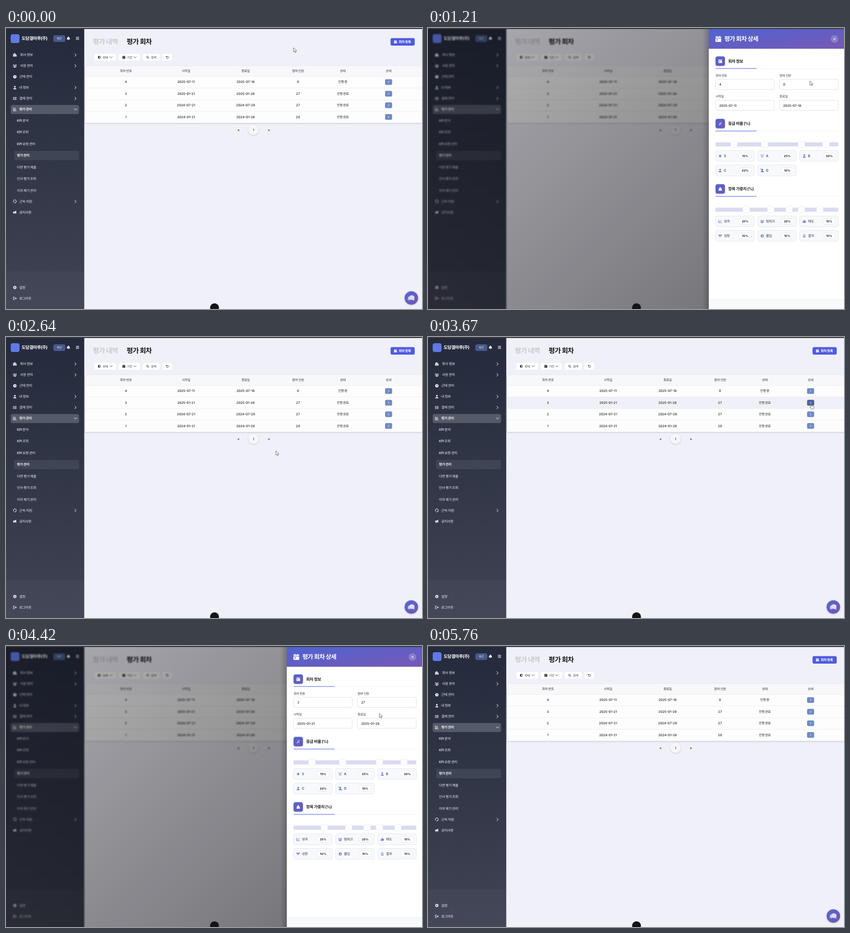
Recreate the animation shown at these times as an HTML page. Size 800 by 542 pixels, loop 5790 ms.

```html
<!DOCTYPE html>
<html lang="ko">
<head>
<meta charset="utf-8">
<title>평가 회차</title>
<style>
  html, body { margin: 0; width: 100%; height: 100%; overflow: hidden; background: #f0f0f9; }
  svg { display: block; width: 100%; height: 100%; }
  text { font-family: Inter, "Noto Sans CJK KR", "Noto Sans CJK", sans-serif; text-rendering: geometricPrecision; }
  .ko { letter-spacing: -.055em; }
  .line { fill: none; stroke: currentColor; stroke-width: 1.5; stroke-linecap: round; stroke-linejoin: round; }
  #page, #shade, #drawer, #cursor, .blink { animation: 5790ms linear infinite; }
  .blink { animation-timing-function: step-end; }
  #page { animation-name: soften; }
  #shade { animation-name: shade; }
  #drawer { animation-name: drawer; }
  #cursor { animation-name: cursor; }
</style>
</head>
<body>
<svg id="stage" viewBox="0 0 800 542" preserveAspectRatio="none"></svg>
<script>
const LOOP = 5790;
const styles = [];
let blinkCount = 0;

const keyframes = (name, frames) => styles.push(
  `@keyframes ${name}{${frames.map(([ms, css]) => `${(ms / LOOP * 100).toFixed(3)}%{${css}}`).join('')}}`);

// Wraps content that is only visible inside the given [start, end] windows.
function during(windows, content) {
  const name = `blink${blinkCount++}`;
  const startsOn = windows[0][0] === 0;
  const frames = startsOn ? [] : [[0, 'opacity:0']];
  windows.forEach(([start, end]) => frames.push([start, 'opacity:1'], [end, `opacity:${end === LOOP ? 1 : 0}`]));
  if (frames[frames.length - 1][0] !== LOOP) frames.push([LOOP, `opacity:${startsOn ? 1 : 0}`]);
  keyframes(name, frames);
  return `<g class="blink" style="animation-name:${name}">${content}</g>`;
}

const rect = (x, y, w, h, fill, r = 0, extra = '') =>
  `<rect x="${x}" y="${y}" width="${w}" height="${h}" rx="${r}" fill="${fill}" ${extra}/>`;
const circle = (x, y, r, fill, extra = '') => `<circle cx="${x}" cy="${y}" r="${r}" fill="${fill}" ${extra}/>`;

function text(x, y, label, size, { fill = '#222', weight = 500, anchor = 'start' } = {}) {
  const cls = /[가-힣]/.test(label) ? 'class="ko"' : '';
  const safe = label.replace('<', '&lt;').replace('>', '&gt;');
  return `<text ${cls} x="${x}" y="${y + size * .36}" font-size="${size}" font-weight="${weight}" fill="${fill}" text-anchor="${anchor}">${safe}</text>`;
}
const centered = (x, y, label, size, options = {}) => text(x, y, label, size, { ...options, anchor: 'middle' });

// Icons live in a box from -5 to 5.
const fills = {
  building: 'M-5-3H-2V-5H2V-1H5V5H-5ZM-3-1V0H-2V-1ZM-3 2V3H-2V2ZM0-3V-2H1V-3ZM0 1V5H1V1Z',
  users: 'M-3.4-4a1.5 1.5 0 1 0 .1 0M3.4-4a1.5 1.5 0 1 0 .1 0M0-2.6a1.8 1.8 0 1 0 .1 0M-3.5 5q0-3.6 3.5-3.6T3.5 5ZM-5.5 2.5q0-3 3-2.8l-1.4 2.8ZM5.5 2.5q0-3-3-2.8l1.4 2.8Z',
  clock: 'M0-5a5 5 0 1 0 .1 0M-.6-3H.6V-.3L2.4 1 1.7 2-.6.4Z',
  user: 'M0-5a2.5 2.5 0 1 0 .1 0M-4.5 5q0-4 4.5-4T4.5 5Z',
  list: 'M-5-4h2v2h-2ZM-2-3.6H5v1.2H-2ZM-5-1h2v2h-2ZM-2-.6H5V.6H-2ZM-5 2h2v2h-2ZM-2 2.4H5v1.2H-2Z',
  chart: 'M-5-5h1.6V3.4H5V5H-5ZM-2-4H2v1.5H-2ZM-2-1.3H4V.2H-2ZM-2 1.3H1v1.3H-2Z',
  horn: 'M-5-2H-1L4-5V4L-1 2H-2L-1 5H-3L-4 2H-5Z',
  bell: 'M-.7-5H.7V-4Q3.6-3.4 3.6 0L4.8 3H-4.8L-3.6 0Q-3.6-3.4-.7-4ZM-1.5 3.6H1.5Q1 5 0 5T-1.5 3.6Z',
  calendar: 'M-5-4H-3V-5.4H-1.7V-4H1.7V-5.4H3V-4H5V-2H-5ZM-5-1.2H5V5H-5ZM-3 .6V2.6H-1V.6Z',
  gear: 'M-1-5H1L1.4-3.4 3-4.2 4.3-2.8 3.4-1.3 5-1V1L3.4 1.4 4.2 3 2.8 4.3 1.3 3.4 1 5H-1L-1.4 3.4-3 4.2-4.3 2.8-3.4 1.3-5 1V-1L-3.4-1.4-4.2-3-2.8-4.3-1.3-3.4ZM0-1.7a1.7 1.7 0 1 0 .1 0',
  half: 'M0-5a5 5 0 1 0 .1 0M0-3.7V3.7A3.7 3.7 0 0 0 0-3.7Z',
  star: 'M0-5 1.5-1.8 5-1.4 2.4 1 3.1 4.6 0 2.8-3.1 4.6-2.4 1-5-1.4-1.5-1.8Z',
  weight: 'M0-5a2 2 0 0 1 1.8 2.6H3.2L5 4.6H-5L-3.2-2.4H-1.8A2 2 0 0 1 0-5Z',
  thumb: 'M-5-1H-3V5H-5ZM-2-1L0-5Q2-5 1.2-1.6H5L4 4.5H-2Z',
  sprout: 'M-5-4Q0-4-.3.3 0-3.8 5-4.4 5 .6.7.9V5H-.7V1.6Q-5 1.6-5-4Z',
  flame: 'M-1-5Q0-3 1.4-3L2.5-4Q4.6-1.3 4.6.6A4.6 4.4 0 0 1-4.6.6Q-4.4-2.6-1-5ZM0-.8Q-2.6 1.4-1.5 2.8T1.8 2.4 0-.8Z'
};
const lines = {
  right: 'M-2-4 2 0-2 4', down: 'M-4-2 0 2 4-2', cross: 'M-3-3 3 3M3-3-3 3', bars: 'M-4-3.4H4M-4 0H4M-4 3.4H4',
  search: 'M-1-4a3.2 3.2 0 1 0 .1 0M1.5 1.5 4.5 4.5', undo: 'M-4-4V-1H-1M-3.6-1.2A4 4 0 1 1-3 3',
  exit: 'M-1-4H-4V4H-1M-1 0H4.5M2-2.5 4.5 0 2 2.5', headset: 'M-4 1V-1A4 4 0 0 1 4-1V1Q4 4 0 4M-3.6 0V2M3.6 0V2M0 4H1',
  percent: 'M-3 3.5 3-3.5M-2.5-2.6V-2.5M2.5 2.5V2.6', medal: 'M-4-4.5-1.5-1M4-4.5 1.5-1M0-1a2.7 2.7 0 1 0 .1 0',
  trend: 'M-4.5-4V4H4.5M-2.5 1-.6-1 1 .4 4-3', ribbon: 'M0-4.5a2.7 2.7 0 1 0 .1 0M-2 1-2.8 4.6 0 3.2 2.8 4.6 2 1', slash: 'M-4.5-4.5 4.5 4.5'
};
const icon = (name, x, y, size, color) =>
  `<g transform="translate(${x} ${y}) scale(${size / 10})" color="${color}">` +
  (fills[name] ? `<path d="${fills[name]}" fill="${color}" fill-rule="evenodd"/>` : `<path class="line" d="${lines[name]}"/>`) + '</g>';

const gradient = (id, from, to, box = 'x2="1" y2="1"') =>
  `<linearGradient id="${id}" ${box}><stop ${from}/><stop offset="1" ${to}/></linearGradient>`;
const stop = (color, opacity = 1) => `stop-color="${color}" stop-opacity="${opacity}"`;

const defs = `<defs>
  ${gradient('side', stop('#242a3b'), stop('#404455'), 'x2="0" y2="1"')}
  ${gradient('violet', stop('#5468d0'), stop('#7356ae'))}
  ${gradient('head', stop('#4f63d2'), stop('#7759b4'))}
  ${gradient('tile', stop('#5067cb'), stop('#6c58b8'))}
  ${gradient('edge', stop('#000', 0), stop('#000', .2), 'x2="1" y2="0"')}
  ${gradient('dim', stop('#000', .28), stop('#000', .56), 'gradientUnits="userSpaceOnUse" x1="64.5" y1="-64.5" x2="735.5" y2="606.5"')}
  <filter id="soft" x="-30%" y="-30%" width="160%" height="180%"><feDropShadow dx="0" dy="1" stdDeviation="1.6" flood-color="#223" flood-opacity=".2"/></filter>
</defs>`;

function sidebar() {
  const item = (name, label, y, x = 25.5, chevron = 'right', weight = 500) =>
    icon(name, 17, y, 6.6, '#e8e9ee') + text(x, y, label, 6.7, { fill: '#eeeff3', weight }) +
    (chevron ? icon(chevron, 133.7, y, 6.4, '#fff') : '');
  const children = ['KPI 분석', 'KPI 조회', 'KPI 요청 관리', '평가 관리', '다면 평가 제출', '인사 평가 조회', '이의 제기 관리'];
  return rect(-10, -10, 160.5, 562, 'url(#side)') + rect(-10, 469.5, 160.5, 90, '#fff', 0, 'opacity=".025"') +
    rect(9, 12, 17, 17, '#6079e6', 4) + text(30, 20, '도담결마루(주)', 8.5, { fill: '#fff', weight: 700 }) +
    rect(91, 14, 23, 13, '#48588c', 3.5) + centered(102.5, 20.4, '퇴근', 5.3, { fill: '#fff' }) +
    icon('bell', 120, 20, 6.8, '#fff') + icon('bars', 137.5, 20, 6.4, '#fff') +
    rect(9, 148.5, 131.5, 17.5, '#555a69', 3.5) + rect(15.5, 237, 125, 18, '#fff', 3, 'opacity=".075"') +
    item('building', '회사 정보', 52, 27) + item('users', '사원 관리', 73, 27) + item('clock', '근태 관리', 94, 25.5, '') +
    item('user', '내 정보', 115, 25) + item('list', '결재 관리', 136) + item('chart', '평가 관리', 157, 25.5, 'down', 700) +
    children.map((label, i) => text(21, 178.2 + i * 22.55, label, 6.6, { fill: '#eeeff3', weight: i === 3 ? 700 : 500 })).join('') +
    item('headset', '근속 지원', 334.7) + item('horn', '공지사항', 355.5, 25.5, '') +
    item('gear', '설정', 500.5, 25.5, '') + item('exit', '로그아웃', 521.5, 25.5, '');
}

const columns = [230.5, 346.3, 460.7, 561.5, 647.5, 735.5];
const rowY = i => 104.2 + i * 22.45;
const rows = [
  ['4', '2025-07-11', '2025-07-18', '0', '진행 중'],
  ['3', '2025-01-21', '2025-01-28', '27', '진행 완료'],
  ['2', '2024-07-21', '2024-07-28', '27', '진행 완료'],
  ['1', '2024-01-21', '2024-01-28', '20', '진행 완료']
];
const rowHover = [
  [[400, 880], [5434, 5460]],
  [[3220, 3690], [5403, 5434]],
  [[3115, 3220], [5370, 5403]],
  [[3055, 3115], [5320, 5370]]
];
const buttonHover = [[[490, 880]], [[3290, 3690]]];

function table() {
  const body = rows.map((cells, i) => {
    const y = rowY(i), top = y - 11.2;
    const button = fill => rect(729, y - 5.5, 13.5, 11, fill, 2.5);
    return rect(152, top, 660, 22.45, '#fdfdfe') + during(rowHover[i], rect(152, top, 660, 22.45, '#f0f0f8')) +
      rect(152, top, 660, .7, '#e9eaf0') + cells.map((c, k) => centered(columns[k], y, c, 6.2)).join('') +
      button('#6f8ac2') + (buttonHover[i] ? during(buttonHover[i], button('#5360a0')) : '') + icon('right', 735.8, y, 5, '#fff');
  }).join('');
  const heads = ['회차 번호', '시작일', '종료일', '참여 인원', '상태', '상세'];
  return rect(152, 73.5, 660, 109.5, '#fdfdfe', 0, 'filter="url(#soft)"') + rect(152, 73.5, 660, 19.5, '#f8f8fb') +
    heads.map((h, i) => centered(columns[i], 83, h, 6.2, { fill: '#333' })).join('') + body;
}

function page() {
  const chip = (x, w, name, label, chevron) => rect(x, 50, w, 13, '#fff', 3) + icon(name, x + 9.5, 56.5, 5.6, '#333') +
    text(x + 15.7, 56.5, label, 5.8, { fill: '#333' }) + (chevron ? icon('down', x + w - 9.5, 56.5, 5.6, '#333') : '');
  return rect(-10, -10, 820, 562, '#f0f0f9') +
    text(167, 26.6, '평가 내역', 13.2, { fill: '#c9c9cd', weight: 700 }) + text(232, 26.6, '평가 회차', 13.2, { fill: '#17171a', weight: 700 }) +
    rect(739.5, 19.5, 46.5, 14.5, '#4f5bdf', 3) + icon('calendar', 748.8, 26.8, 5.6, '#fff') +
    text(755.3, 26.8, '회차 등록', 6.4, { fill: '#fff', weight: 700 }) +
    chip(170, 41.5, 'half', '상태', true) + chip(217, 40.5, 'calendar', '기간', true) + chip(263, 32.5, 'search', '검색') +
    rect(301, 50, 18.5, 13, '#fff', 3) + icon('undo', 310.2, 56.5, 5.4, '#333') + table() +
    circle(476, 196.3, 9.8, '#f6f6fa', 'filter="url(#soft)"') +
    centered(447, 196.3, '<', 6.2, { weight: 700 }) + centered(476, 196.3, '1', 6.2) + centered(505.5, 196.3, '>', 6.2, { weight: 700 }) +
    circle(779.5, 520.7, 13, 'url(#violet)', 'filter="url(#soft)"') +
    '<path d="M777 525.5q-2 0-3.5-1.5l-1 1.5.3-3q-.7-4 3.5-5" fill="#c8c4ea"/>' +
    '<path d="M780 515.5q5.8.4 5.5 4.7.3 1.5-.6 2.7l.9 3-3.2-1.4q-6.9.7-7.4-4 .1-4.6 4.8-5Z" fill="#dedcf4"/>' + sidebar();
}

function drawer() {
  const section = (y, name, label) => rect(553, y - 9.3, 18, 18.3, 'url(#tile)', 4, 'filter="url(#soft)"') + icon(name, 562, y, 7, '#fff') +
    text(577.3, y, label, 7.8, { weight: 700 }) + rect(553, y + 13.9, 236, .7, '#eeeff4') + rect(553, y + 13.5, 79, 1.2, '#6e83ea');
  const field = (x, y, label, index) => text(x, y, label, 6, { fill: '#333' }) +
    rect(x, y + 7, 113, 19.6, '#fff', 3.5, 'stroke="#d9dce4" stroke-width=".8"') +
    during([[0, 3000]], text(x + 7, y + 17, rows[0][index], 6.2)) + during([[3000, LOOP]], text(x + 7, y + 17, rows[1][index], 6.2));

  const weights = (y, entries) => {
    let sum = 0;
    const handles = entries.slice(0, -1).map(([, , share]) => {
      sum += share;
      const x = 553 + 2.36 * sum;
      return rect(x - 6.5, y - 5.7, 13, 11.4, '#fff', 2.5, 'stroke="#e3e5ed" stroke-width=".7"') + rect(x - .3, y - 2, .6, 4, '#e5e6ee');
    }).join('');
    const cards = entries.map(([name, label, share], i) => {
      const x = 553 + (i % 3) * 80.9, cy = y + 22.4 + Math.floor(i / 3) * 28;
      return rect(x, cy - 10.4, 74.4, 20.8, '#f8f9fc', 4, 'stroke="#e1e4ee" stroke-width=".8"') + icon(name, x + 8.8, cy, 6.4, '#6680d0') +
        (label === 'D' ? icon('slash', x + 8.8, cy, 7, '#6680d0') : '') + text(x + 16, cy, label, 6.5, { fill: '#333' }) +
        rect(x + 44.4, cy - 5.6, 25, 11.2, '#fff', 5.6, 'stroke="#dde1ec" stroke-width=".7"') +
        centered(x + 56.9, cy, share + '%', 5.7, { weight: 700 });
    }).join('');
    return rect(553, y - 4, 236, 8, '#d9dcf0', 1) + handles + cards;
  };

  return rect(528, 2, 12, 540, 'url(#edge)') + rect(540, 2, 300, 540, '#fff') + rect(540, 2, 260, 38, 'url(#head)') +
    icon('calendar', 558.3, 21.2, 11, '#fff') + text(570, 21.2, '평가 회차 상세', 11.7, { fill: '#fff', weight: 700 }) +
    circle(781.7, 21.2, 7.4, '#fff', 'opacity=".2"') + icon('cross', 781.7, 21.2, 6.4, '#fff') +
    section(64, 'calendar', '회차 정보') + field(553, 92, '회차 번호', 0) + field(676, 92, '참여 인원', 3) +
    field(553, 132.3, '시작일', 1) + field(676, 132.3, '종료일', 2) +
    section(184.6, 'percent', '등급 비율 (%)') +
    weights(224.4, [['star', 'S', 15], ['medal', 'A', 25], ['user', 'B', 30], ['user', 'C', 20], ['user', 'D', 10]]) +
    section(310.6, 'weight', '항목 가중치 (%)') +
    weights(350.5, [['trend', '성과', 25], ['users', '팀워크', 20], ['thumb', '태도', 15], ['sprout', '성장', 10], ['flame', '몰입', 15], ['ribbon', '결과', 15]]) +
    rect(540, 523, 260, 19, '#f8f9fb') + rect(540, 523, 260, .6, '#eceef3');
}

function cursor() {
  const outline = 'fill="#fff" stroke="#333" stroke-width=".65" stroke-linejoin="round"';
  const arrow = `<path d="M0 0V8.2L1.9 6.5 3.2 9.3 4.6 8.7 3.4 6H6Z" ${outline}/>`;
  const hand = `<path d="M-.8 6V.9Q0-.3.8.9V4Q2 3.3 2.3 4.3 3.6 3.6 3.9 4.7 5.2 4.4 5.2 5.8 5.2 8.4 4 10H.2L-2.3 6.9Q-2.3 5.4-.8 6Z" ${outline}/>`;
  return during([[0, 490], [880, 3290], [3690, LOOP]], arrow) + during([[490, 880], [3290, 3690]], hand);
}

// Both visits to the drawer share the same slide and fade.
const visits = [[880, 1210, 2375, 2630], [3685, 4000, 4860, 5130]];
function toggled(name, closed, open) {
  const easeIn = ';animation-timing-function:cubic-bezier(.25,.1,.25,1)';
  keyframes(name, [[0, closed],
    ...visits.flatMap(([a, b, c, d]) => [[a, closed + easeIn], [b, open], [c, open + easeIn], [d, closed]]), [LOOP, closed]]);
}
toggled('drawer', 'transform:translateX(275px)', 'transform:translateX(0)');
toggled('shade', 'opacity:0', 'opacity:1');
toggled('soften', 'filter:blur(0)', 'filter:blur(1.2px)');

const at = (ms, x, y, curve = 'linear') => [ms, `transform:translate(${x}px,${y}px);animation-timing-function:${curve}`];
const glide = 'cubic-bezier(.35,0,.35,1)';
keyframes('cursor', [
  at(0, 553, 38, glide), at(600, 734.5, 102), at(1660, 734.5, 102, glide),
  at(2360, 530, 210), at(2640, 519, 219.5), at(2790, 516, 221), at(2850, 516, 221, glide),
  at(3420, 737, 129), at(4200, 737, 129, 'ease-in'), at(4420, 718.5, 129.5, 'cubic-bezier(.25,.3,.4,1)'),
  at(4840, 528, 205), at(5200, 528, 205, 'cubic-bezier(.4,0,.6,1)'), at(5720, 545, -16), at(LOOP, 545, -16)
]);

document.getElementById('stage').innerHTML = defs + `<g id="page">${page()}</g>` +
  rect(0, 0, 800, 542, 'url(#dim)', 0, 'id="shade"') + `<g id="drawer">${drawer()}</g>` +
  rect(0, 0, 800, 2, '#3b3b3f') + circle(401, 539.5, 8.6, '#141416') + `<g id="cursor">${cursor()}</g>`;
document.head.appendChild(document.createElement('style')).textContent = styles.join('\n');
</script>
</body>
</html>
```
